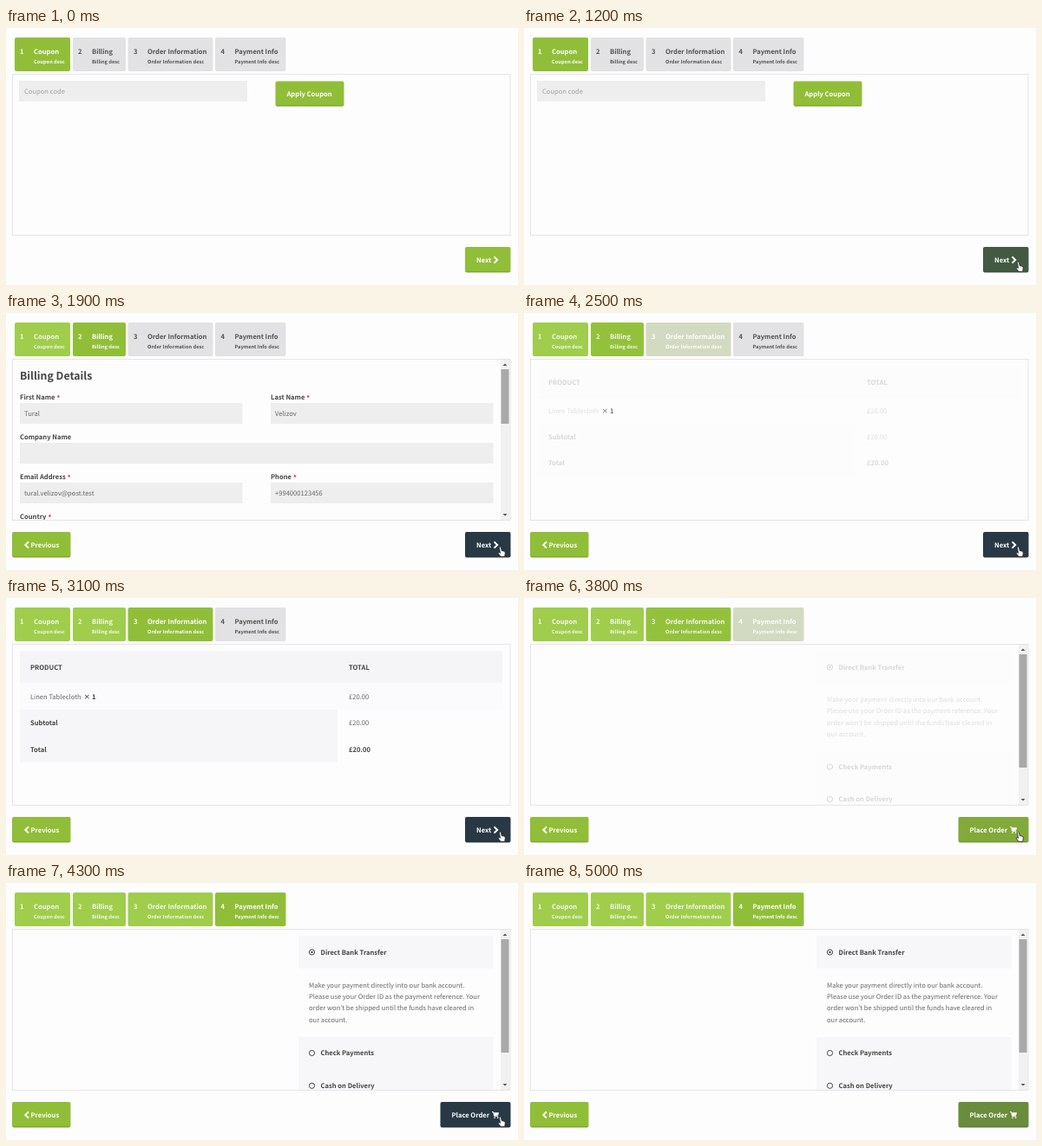
Write an HTML page with a canvas that moves like this. It is 590 by 297 pixels and loops after 5100 ms.

```html
<!DOCTYPE html>
<html lang="en">
<head>
<meta charset="utf-8">
<title>Checkout steps</title>
<style>
html, body { margin: 0; width: 100%; height: 100%; overflow: hidden; background: #fefdfe; }
canvas { display: block; }
</style>
</head>
<body>
<canvas id="stage" width="590" height="297"></canvas>
<script>
const ctx = document.getElementById('stage').getContext('2d');
const FONT = '"Noto Sans CJK JP", "Noto Sans CJK SC", "Noto Sans CJK", "Open Sans", sans-serif';
const LOOP = 5100, STEP = 100, FADE = 500, HOVER = 400;
const PAPER = '#fefdfe', FIELD = '#efeeef', PANEL = '#f7f6f8', INK = '#444';
const GREY = [226, 225, 227], GREEN = [145, 190, 56], DONE = [160, 205, 76], DARK = [40, 57, 69];

const TABS = [
  { x: 10, w: 64, textX: 32, title: 'Coupon' },
  { x: 77, w: 61, textX: 99, title: 'Billing' },
  { x: 140.5, w: 98, textX: 163, title: 'Order Information', desc: 'Order Information desc' },
  { x: 241, w: 81.5, textX: 263.5, title: 'Payment Info' }
];
const PAGE_START = [-FADE, 1200, 2400, 3700];

const clamp = v => Math.min(1, Math.max(0, v));
const mix = (a, b, p) => `rgb(${a.map((v, i) => Math.round(v + (b[i] - v) * p))})`;

function box(x, y, w, h, color, radius = 0) {
  ctx.fillStyle = color;
  ctx.beginPath();
  ctx.roundRect(x, y, w, h, radius);
  ctx.fill();
}

// Draws text centred vertically on its capitals and returns its right edge.
function text(str, x, y, color = INK, weight = 400, size = 7.6) {
  ctx.font = `${weight} ${size}px ${FONT}`;
  ctx.fillStyle = color;
  ctx.fillText(str, x, y + size * 0.37);
  return x + ctx.measureText(str).width;
}
const bold = (str, x, y, color, size) => text(str, x, y, color, 700, size);

function line(points, color, width) {
  ctx.strokeStyle = color;
  ctx.lineWidth = width;
  ctx.beginPath();
  points.forEach(([x, y]) => ctx.lineTo(x, y));
  ctx.stroke();
}

function triangle(x, y, dir) {
  ctx.fillStyle = '#555';
  ctx.beginPath();
  ctx.moveTo(x - 2.5, y - dir);
  ctx.lineTo(x + 2.5, y - dir);
  ctx.lineTo(x, y + 1.5 * dir);
  ctx.fill();
}

function button(x, y, w, h, color = mix(GREEN, DARK, 0)) {
  box(x, y, w, h, color, 2);
  box(x + 1, y + h - 1.2, w - 2, 1.2, 'rgba(0,0,0,.16)', 1);
}

const chevron = (x, y, dir) =>
  line([[x - 2 * dir, y - 3.6], [x + 1.7 * dir, y], [x - 2 * dir, y + 3.6]], '#fff', 2);

function cart(x, y) {
  line([[x, y - 3.3], [x + 1.6, y - 3.3], [x + 2.7, y + 1.6], [x + 7.2, y + 1.6]], '#fff', 1);
  ctx.fillStyle = '#fff';
  ctx.beginPath();
  ctx.moveTo(x + 1.8, y - 2.7);
  ctx.lineTo(x + 8, y - 2.7);
  ctx.lineTo(x + 7.2, y + 0.5);
  ctx.lineTo(x + 2.5, y + 1);
  ctx.fill();
  box(x + 2.2, y + 2.4, 1.7, 1.7, '#fff', 1);
  box(x + 5.8, y + 2.4, 1.7, 1.7, '#fff', 1);
}

const HAND = new Path2D('M-1 1Q0-.6 1 1L1.7 4.7 4.4 5.2Q5.8 5.6 5.8 7.2L5.2 11.6H.7L-2.2 8Q-2.7 6.6-1.2 6.8L0 7.6Z');
function hand(x, y) {
  ctx.save();
  ctx.translate(x, y);
  ctx.fillStyle = '#fff';
  ctx.strokeStyle = '#222';
  ctx.lineWidth = 0.8;
  ctx.fill(HAND);
  ctx.stroke(HAND);
  ctx.restore();
}

function drawTabs(page, p) {
  TABS.forEach(({ x, w, textX, title }, i) => {
    let fill = mix(GREY, GREEN, 0), ink = '#525252';
    if (i < page) {
      fill = mix(GREEN, DONE, i === page - 1 ? p : 1);
      ink = 'rgba(255,255,255,.9)';
    } else if (i === page) {
      fill = mix(GREY, GREEN, p);
      ink = '#fff';
    }
    box(x, 11, w, 39, fill, 2);
    bold(i + 1, textX - 16, 27, ink);
    bold(title, textX, 27, ink);
    bold(title + ' desc', textX, 39, ink, 5.7);
  });
}

function drawScrollbar(thumbHeight) {
  box(570, 54, 10.5, 185, '#f2f1f2');
  box(570.5, 65, 9, thumbHeight, '#aaa9aa');
  triangle(575, 60, -1);
  triangle(575, 233, 1);
}

function couponPage() {
  box(15, 61, 263, 24, FIELD);
  text('Coupon code', 21, 73, '#a3a3a3');
  button(310.5, 61.5, 79, 29);
  bold('Apply Coupon', 323.5, 76, '#fff');
}

function billingPage() {
  const field = (label, x, y, w, value = '', required = true) => {
    const end = bold(label, x, y);
    if (required) bold('*', end + 2, y + 0.5, '#d22');
    box(x, y + 6.5, w, 24, FIELD);
    text(value, x + 5, y + 19, '#666');
  };
  bold('Billing Details', 16, 72, INK, 12.3);
  field('First Name', 16, 97.5, 256.5, 'Tural');
  field('Last Name', 305, 97.5, 256.5, 'Velizov');
  field('Company Name', 16, 143.5, 545.5, '', false);
  field('Email Address', 16, 189.5, 256.5, 'tural.velizov@post.test');
  field('Phone', 305, 189.5, 256.5, '+994000123456');
  field('Country', 16, 235.5, 545.5);
}

function orderPage(p, at) {
  box(16, 61.5, 556, at(98) - 61.5, '#f5f4f6');
  box(16, at(98), 556, at(129) - at(98), '#fbfafc');
  box(16, at(129), 366, at(189.5) - at(129), '#f6f5f7');
  bold('PRODUCT', 28, at(80));
  bold('TOTAL', 395, at(80));
  const end = text('Linen Tablecloth', 28, at(114), '#666');
  text('£20.00', 395, at(114), '#666');
  bold('Subtotal', 28, at(144.3));
  text('£20.00', 395, at(144.3), '#666');
  bold('Total', 28, at(174.7));
  bold('£20.00', 395, at(174.7));
  ctx.globalAlpha = Math.max(0.7, p);
  bold('× 1', end + 3, at(114));
}

function paymentPage(p, at) {
  const option = (label, y, chosen) => {
    ctx.strokeStyle = INK;
    ctx.lineWidth = 1;
    ctx.beginPath();
    ctx.arc(352.5, y, 3.1, 0, 7);
    ctx.stroke();
    if (chosen) box(351.3, y - 1.2, 2.4, 2.4, INK, 1.2);
    bold(label, 362.5, y);
  };
  box(337, 61, 224.5, 37.5, PANEL);
  box(337, at(178), 224.5, 62, PANEL);
  option('Direct Bank Transfer', at(80), true);
  [
    'Make your payment directly into our bank account.',
    'Please use your Order ID as the payment reference. Your',
    'order won’t be shipped until the funds have cleared in',
    'our account.'
  ].forEach((row, i) => text(row, 349, at(118 + i * 13.3), '#666'));
  option('Check Payments', at(196.5));
  option('Cash on Delivery', at(234.3));
}

const PAGES = [couponPage, billingPage, orderPage, paymentPage];

function drawContent(page, p) {
  const at = y => 80 + (y - 80) * (0.985 + 0.015 * p);
  ctx.save();
  ctx.beginPath();
  ctx.rect(7, 53, 574, 186.5);
  ctx.clip();
  ctx.globalAlpha = p;
  PAGES[page](p, at);
  ctx.globalAlpha = 1;
  if (page === 1) drawScrollbar(63);
  if (page === 3) drawScrollbar(131);
  ctx.restore();
  ctx.strokeStyle = '#e5e4e6';
  ctx.lineWidth = 1;
  ctx.strokeRect(7.5, 53.5, 573.5, 186);
}

function drawButtons(page, t) {
  if (page > 0) {
    button(7, 253, 67.5, 29.5);
    chevron(24, 268, -1);
    bold('Previous', 28.5, 268, '#fff');
  }
  if (page < 3) {
    button(529, 253, 52.5, 29.5, mix(GREEN, DARK, clamp((t - 900) / HOVER)));
    bold('Next', 542, 268, '#fff');
    chevron(564.5, 268, 1);
  } else {
    const hover = clamp((t - 3740) / HOVER) - clamp((t - 4750) / HOVER);
    button(500.5, 253, 81, 29.5, mix(GREEN, DARK, hover));
    bold('Place Order', 513.5, 268, '#fff');
    cart(560, 268);
  }
}

function draw(now) {
  const t = Math.floor(now % LOOP / STEP) * STEP;
  const page = PAGE_START.filter(start => t > start).length - 1;
  const p = clamp((t - PAGE_START[page]) / FADE);

  box(0, 0, 590, 297, PAPER);
  ctx.textRendering = 'geometricPrecision';
  drawTabs(page, p);
  drawContent(page, p);
  drawButtons(page, t);
  if (t >= 800 && t < 4700) {
    const left = (1 - clamp((t - 800) / 300)) ** 2;
    hand(569.5 + 13 * left, 270 - 6 * left);
  }
}

const begin = performance.now();
function tick() {
  draw(performance.now() - begin);
  requestAnimationFrame(tick);
}
tick();
</script>
</body>
</html>
```
